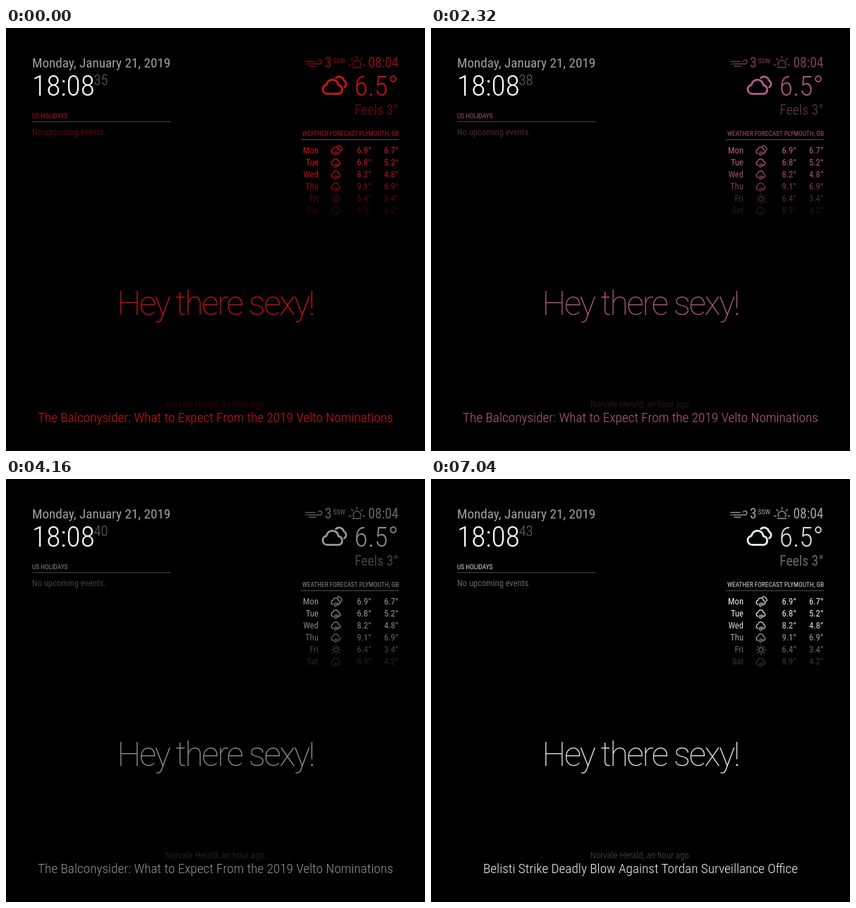
Animation, 594 px wide and 600 px high, one loop 7080 ms. Source, as an HTML page:

```html
<!DOCTYPE html>
<html lang="en">
<head>
<meta charset="utf-8">
<title>Mirror dashboard</title>
<style>
  html, body { margin: 0; width: 100%; height: 100%; overflow: hidden; background: #000; }
  svg { display: block; width: 594px; height: 600px; }
  text { fill: currentColor; font-family: "Roboto Condensed", Roboto, sans-serif; font-stretch: condensed; }
  text.wide { font-family: Roboto, sans-serif; font-stretch: normal; letter-spacing: -2.25px; }
  path, circle { fill: none; stroke: currentColor; stroke-linecap: round; stroke-linejoin: round; }
  .rule { color: #4c4c4c; stroke-linecap: butt; }
</style>
</head>
<body>
<svg id="stage" viewBox="0 0 594 600"></svg>
<script>
const LOOP = 7080;
const NS = "http://www.w3.org/2000/svg";
const stage = document.getElementById("stage");

// Condense uniformly only when no condensed face is available.
const pen = document.createElement("canvas").getContext("2d");
const measure = font => {
  pen.font = font;
  return pen.measureText("No upcoming events 2019").width;
};
const hasCondensed =
  measure('condensed 40px "Roboto Condensed", Roboto, sans-serif') < 0.97 * measure("40px Roboto, sans-serif");
const squeeze = hasCondensed ? 1 : 0.885;

function add(parent, tag, attrs) {
  const node = document.createElementNS(NS, tag);
  for (const key in attrs) node.setAttribute(key, attrs[key]);
  return parent.appendChild(node);
}

function label(parent, str, x, y, size, { weight = 400, anchor = "start", alpha = 1, wide = false, color } = {}) {
  const node = add(parent, "text", {
    transform: `translate(${x} ${y}) scale(${wide ? 1 : squeeze} 1)`,
    "font-size": size, "font-weight": weight, "text-anchor": anchor, opacity: alpha
  });
  if (wide) node.setAttribute("class", "wide");
  if (color) node.style.color = color;
  node.textContent = str;
  return node;
}

function group(parent, x, y, scale = 1, alpha = 1) {
  return add(parent, "g", { transform: `translate(${x} ${y}) scale(${scale})`, opacity: alpha });
}

const line = (parent, d, width) => add(parent, "path", { d, "stroke-width": width });
const rule = (x1, x2, y) => line(stage, `M${x1} ${y}H${x2}`, 1).setAttribute("class", "rule");

function rays(parent, from, to, start, count, width) {
  for (let i = 0; i < count; i++) {
    const a = (start + i * 45) * Math.PI / 180;
    const c = Math.cos(a), s = Math.sin(a);
    line(parent, `M${from * c} ${from * s}L${to * c} ${to * s}`, width);
  }
}

const CLOUD = "M-8.5 8.5A6.3 6.3 0 0 1-9.3-4A8.2 8.2 0 0 1 7-3.5A6.2 6.2 0 0 1 8 8.5";
const BEHIND = "M3.5-13.5A6.6 6.6 0 0 1 14.5-10A5.4 5.4 0 0 1 15-.5";

function rain(parent, x, y, double) {
  const icon = group(parent, x, y, 0.47);
  line(icon, CLOUD, 2.5);
  if (double) line(icon, BEHIND, 2.5);
  line(icon, "M-2.5 3L-5.5 13M2.5 3L-1.5 15M6 5L4 12", 2.3);
}

function sun(parent, x, y) {
  const icon = group(parent, x, y);
  add(icon, "circle", { r: 3.1, "stroke-width": 1.1 });
  rays(icon, 5.2, 6.7, 0, 8, 1.1);
}

// Clock
label(stage, "Monday, January 21, 2019", 37, 56, 19.15, { color: "#a0a0a0" });
label(stage, "18:08", 37, 95.5, 41.4, { weight: 300, color: "#fff" });
const seconds = label(stage, "", 124.5, 81, 20.7, { weight: 300, color: "#666" });

// Holidays
const end = { anchor: "end" };
label(stage, "US HOLIDAYS", 37, 128, 9.4, { alpha: 0.9 });
rule(37, 234, 132.8);
label(stage, "No upcoming events.", 37, 152.2, 12.55, { alpha: 0.42 });

// Current weather
const wind = group(stage, 425, 50, 1, 0.6);
line(wind, "M0-2.5H13M3 1H20A2.8 2.8 0 1 0 17.5-3M0 1H1M5 4.2H14", 1.4);
label(stage, "3", 452, 56, 19.5, { alpha: 0.68 });
label(stage, "SSW", 463.5, 49.5, 9.75, { alpha: 0.68 });
const sunrise = group(stage, 497.5, 51, 1, 0.62);
line(sunrise, "M-4.5 2.5A5.2 5.2 0 1 1 4.5 2.5M-6 5H6M-11 1.5H-8.5M8.5 1.5H11", 1.4);
rays(sunrise, 8.2, 11, 225, 3, 1.4);
label(stage, "08:04", 556.5, 56, 19.5, { ...end, alpha: 0.68 });
const cloud = group(stage, 464, 84.7, 1.03);
line(cloud, CLOUD + "Z", 2.7);
line(cloud, BEHIND, 2.5);
label(stage, "6.5°", 556.5, 95.5, 39.5, { ...end, weight: 300, alpha: 0.9 });
label(stage, "Feels 3°", 556.5, 122.5, 19.5, { ...end, alpha: 0.44 });

// Forecast
label(stage, "WEATHER FORECAST PLYMOUTH, GB", 557, 153, 9.3, { ...end, alpha: 0.9 });
rule(418, 557, 158.5);
[
  ["Mon", "6.9°", "6.7°"], ["Tue", "6.8°", "5.2°"], ["Wed", "8.2°", "4.8°"],
  ["Thu", "9.1°", "6.9°"], ["Fri", "6.4°", "3.4°"], ["Sat", "8.9°", "4.2°"]
].forEach(([day, high, low], i) => {
  const row = group(stage, 0, 174 + i * 17.05, 1, Math.min(1, 1 - (i - 1.5) / 4.5));
  label(row, day, 443, 4.2, 12.6, end);
  if (day === "Fri") sun(row, 468, 0);
  else rain(row, 468, 0, day === "Mon");
  label(row, high, 518, 4.2, 12.6, end);
  label(row, low, 556.5, 4.2, 12.6, end);
});

// Greeting and news
const middle = { anchor: "middle", weight: 300 };
label(stage, "Hey there sexy!", 296.8, 407, 48, { anchor: "middle", weight: 100, wide: true });
const news = group(stage, 297, 0);
label(news, "Norvale Herald, an hour ago:", 0, 537.5, 13, { ...middle, alpha: 0.33 });
const headline = label(news, "", 0, 559, 19.25, middle);
const HEADLINES = [
  "The Balconysider: What to Expect From the 2019 Velto Nominations",
  "Belisti Strike Deadly Blow Against Tordan Surveillance Office"
];
const SWAP = 5340, FADE = 1200;

const TINTS = [
  [0, 212, 20, 24], [680, 214, 24, 18], [1400, 172, 150, 82], [3040, 192, 52, 174],
  [4160, 158, 150, 154], [5320, 124, 192, 122], [7040, 232, 248, 232], [LOOP, 232, 248, 232]
];

function tint(t) {
  const i = TINTS.findIndex(key => key[0] > t);
  const a = TINTS[i - 1], b = TINTS[i];
  const p = (t - a[0]) / (b[0] - a[0]);
  return `rgb(${[1, 2, 3].map(c => Math.round(a[c] + (b[c] - a[c]) * p))})`;
}

const ease = p => 1 - (1 - Math.min(1, Math.max(0, p))) ** 2.3;

function draw(t) {
  stage.style.color = tint(t);
  seconds.textContent = 35 + Math.floor((t + 960) / 1000);
  const next = t >= SWAP;
  headline.textContent = HEADLINES[+next];
  news.setAttribute("opacity", next ? ease((t - SWAP) / FADE) : 1 - ease((t - SWAP + FADE) / FADE));
}

const start = performance.now();
function tick() {
  draw((performance.now() - start) % LOOP);
  requestAnimationFrame(tick);
}
tick();
</script>
</body>
</html>
```
